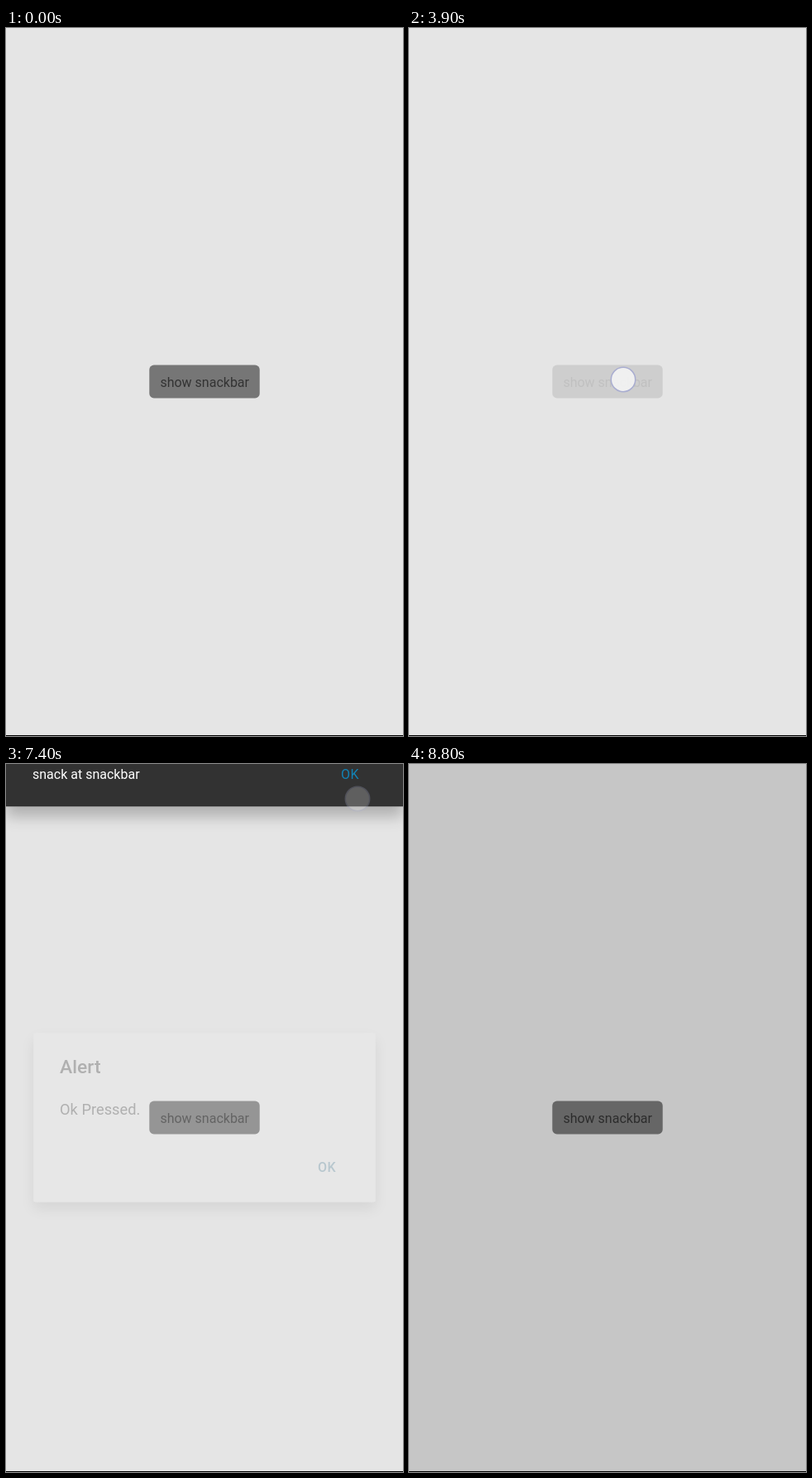
An HTML page that plays this animation: 480x854 px, repeating every 8.9 s.

```html
<!DOCTYPE html>
<html lang="en">
<head>
<meta charset="utf-8">
<title>Snackbar demo</title>
<style>
  html, body { margin: 0; height: 100%; overflow: hidden; background: #e5e5e5; }
  svg { display: block; width: 100%; height: 100%; }
  text { font: 16px Roboto, sans-serif; }
  .medium { font-weight: 500; }
  .ok { letter-spacing: .5px; }
</style>
</head>
<body>
<svg viewBox="0 0 480 854">
  <defs>
    <filter id="barShadow" filterUnits="userSpaceOnUse" x="-60" y="-60" width="600" height="220">
      <feDropShadow dx="0" dy="12" stdDeviation="9" flood-opacity=".24"/>
    </filter>
    <filter id="cardShadow" filterUnits="userSpaceOnUse" x="-20" y="270" width="520" height="320">
      <feDropShadow dx="0" dy="8" stdDeviation="8.5" flood-opacity=".28"/>
    </filter>
  </defs>
  <rect width="480" height="854" fill="#e5e5e5"/>
  <g id="button">
    <rect x="173.3" y="406.6" width="133.4" height="39.8" rx="5.5" fill="#767676"/>
    <text x="240.2" y="433" text-anchor="middle" fill="#333">show snackbar</text>
  </g>
  <g id="bar">
    <rect width="480" height="80" fill="#323232" filter="url(#barShadow)"/>
    <text x="32" y="47" fill="#fff">snack at snackbar</text>
    <text id="action" class="ok" x="405" y="47" fill="#03a9f4">OK</text>
  </g>
  <rect id="dim" width="480" height="854"/>
  <g id="card">
    <rect x="33.4" y="324.4" width="413.2" height="203.8" rx="2.3" fill="#eee" filter="url(#cardShadow)"/>
    <text x="65" y="373" class="medium" fill="#1d1d1d" style="font-size:22.86px">Alert</text>
    <text x="65" y="422.5" fill="#1d1d1d" style="font-size:18.29px">Ok Pressed.</text>
    <text x="377" y="492" class="medium ok" fill="#3a7590">OK</text>
  </g>
  <circle id="dot" r="14.7" fill="#f2f2f2" fill-opacity=".93" stroke="#a9add0" stroke-width="1.5"/>
  <rect y="853" width="480" height="1"/>
</svg>
<script>
const LOOP = 8900, STEP = 100, HIDDEN = -115, SWIPE = 520;
const $ = id => document.getElementById(id);

// Progress from 0 to 1, beginning at a time and lasting a duration.
const ramp = (t, begin, duration) => Math.min(1, Math.max(0, (t - begin) / duration));
const smooth = p => p * p * (3 - 2 * p);

const tap = (down, up, x, y) => ({ down, up, x, y });
const shows = [tap(1400, 1400, 259, 424), tap(3900, 4000, 259, 424), tap(6200, 6200, 259, 437)];
const swipeRight = { ...tap(2500, 3050, 110, 45), side: 1, reach: 270, drop: 0 };
const swipeLeft = { ...tap(4700, 5425, 400, 50), side: -1, reach: 377, drop: 80 };
const confirm = tap(7200, 7250, 425, 42);
const dismiss = tap(8500, 8480, 400, 485);
const touches = [shows[0], swipeRight, shows[1], swipeLeft, shows[2], confirm, dismiss];
const leaves = [swipeRight, swipeLeft, confirm];

const latest = (list, t) => list.findLast(touch => touch.down <= t);
const pressed = (touch, t) => touch ? .2 + .8 * ramp(t, touch.up, 250) : 1;
const travel = (swipe, t) => SWIPE * ramp(t, swipe.down, 800) ** 2;

function barPlace(t) {
  const i = shows.findLastIndex(show => show.up <= t);
  if (i < 0) return [0, HIDDEN];
  const leave = leaves[i];
  if (t < leave.down) return [0, HIDDEN * (1 - smooth(ramp(t, shows[i].up, 300)))];
  return leave.side
    ? [leave.side * travel(leave, t), 0]
    : [0, HIDDEN * ramp(t, leave.down, 400) ** 2];
}

function dotPlace(touch, t) {
  if (!touch.side) return [touch.x, touch.y];
  const moved = Math.min(touch.reach, travel(touch, t));
  return [touch.x + touch.side * moved, touch.y + touch.drop * moved / touch.reach];
}

const fade = (id, alpha) => $(id).setAttribute('opacity', alpha);
const move = (id, [x, y]) => $(id).setAttribute('transform', `translate(${x} ${y})`);

function draw(now) {
  let t = Math.floor(now % LOOP / STEP) * STEP;
  // The picture rests after the second swipe until the next tap.
  if (t > 5600 && t < shows[2].down) t = 5600;

  const touch = latest(touches, t);
  move('bar', barPlace(t));
  fade('button', pressed(latest(shows, t), t));
  fade('action', pressed(latest([confirm], t), t));
  fade('dim', .6 * (ramp(t, 7400, 200) - smooth(ramp(t, 8530, 390))));
  fade('card', smooth(ramp(t, 7300, 300)) - smooth(ramp(t, dismiss.down, 300)));
  fade('dot', touch ? 1 - ramp(t, touch.up, 200) : 0);
  if (touch) move('dot', dotPlace(touch, t));
}

let start;
function tick(now) {
  start ??= now;
  draw(now - start);
  requestAnimationFrame(tick);
}
draw(0);
requestAnimationFrame(tick);
</script>
</body>
</html>
```
